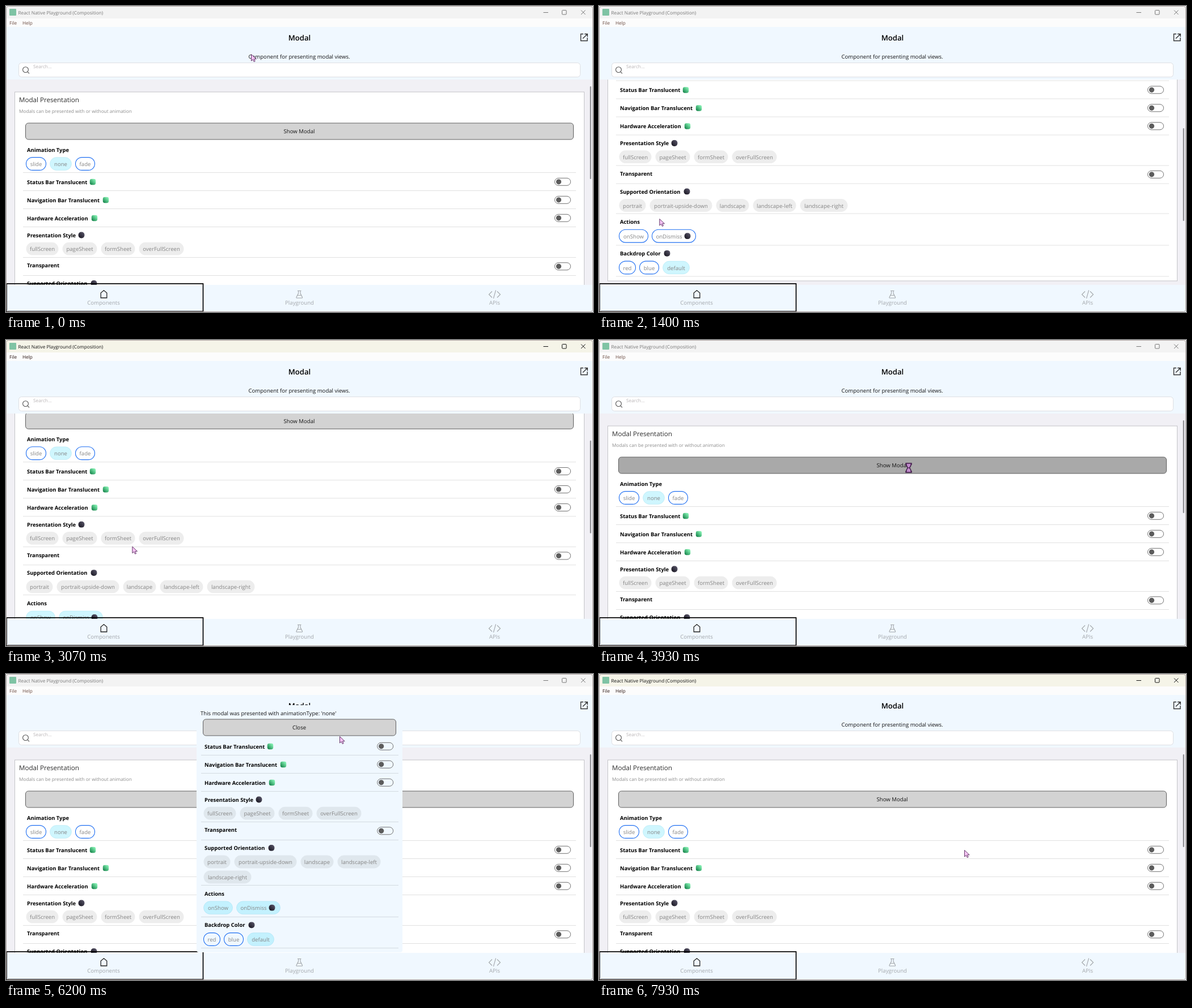
These frames come from a looping animation (1035x541 px, 8 s). An HTML page:

```html
<!DOCTYPE html>
<html lang="en">
<head>
<meta charset="utf-8">
<title>React Native Playground</title>
<style>
  html, body { margin: 0; width: 100%; height: 100%; overflow: hidden; background: #fff; }
  svg { display: block; width: 1035px; height: 541px; }
  text { font-family: "Open Sans", "Noto Sans", sans-serif; font-size: 9.6px; fill: #151515; text-rendering: geometricPrecision; }
  .mid { text-anchor: middle; }
  .small { font-size: 8.25px; }
  .label { font-size: 9.42px; font-weight: 700; fill: #000; }
  .chip .pill { fill: none; stroke: none; }
  .chip text { fill: #858585; }
  .chip.open .pill { stroke: #1f6ff2; stroke-width: 1.1; }
  .chip.on .pill { fill: rgba(0, 204, 247, .19); stroke: rgba(0, 160, 200, .12); }
  .chip.off .pill { fill: rgba(0, 0, 0, .07); }
  .line { stroke: rgba(0, 0, 0, .12); }
  .button rect { fill: #d3d3d3; stroke: #606060; }
  .button.pressed rect { fill: #a9a9a9; }
  .tab text, .tab path { fill: #a3a7ab; }
  .tab path { fill: none; stroke: #a3a7ab; stroke-width: 1.1; }
  #frame text { fill: #777; }
  #frame .menu { fill: #6a4a40; }
  #frame .glyph { stroke: #777; fill: none; }
  #bar { fill: #f3f3f3; }
  .active #bar { fill: #f5f4e8; }
  #frame.active text { fill: #111; }
  #frame.active .menu { fill: #2a1512; }
  #frame.active .glyph { stroke: #111; }
</style>
</head>
<body>
<svg id="stage" viewBox="0 0 1035 541"></svg>
<script>
const $ = id => document.getElementById(id);
const text = (x, y, s, cls = '') => `<text x="${x}" y="${y}" class="${cls}">${s}</text>`;
const rect = (x, y, w, h, attrs = '') => `<rect x="${x}" y="${y}" width="${w}" height="${h}" ${attrs}/>`;
const path = (d, attrs = '') => `<path d="${d}" ${attrs}/>`;
const rule = (x1, x2, y) => path(`M${x1} ${y}H${x2}`, 'class="line"');
const green = (x, y) => rect(x - 5.2, y - 5.2, 10.4, 10.4, 'rx="3.4" fill="url(#green)"');
const dark = (x, y) => rect(x - 5.4, y - 5.4, 10.8, 10.8, 'rx="4.8" fill="url(#dark)"');

const button = (id, x, y, w, label) => `<g id="${id}" class="button">
  ${rect(x + .5, y, w - 1, 29, 'rx="5"')}${text(517, y + 18.3, label, 'mid')}</g>`;

const toggle = (x, y) => rect(x - 14, y - 6.5, 28, 13, 'rx="6.5" fill="none" stroke="#707070"')
  + `<circle cx="${x - 7}" cy="${y}" r="4.6" fill="#5c5c5c"/>`;

// items: [label, width, state, id, badge]; chips sit 6px apart
function chips(x, y, items) {
  return items.map(([label, w, state, id = '', badge]) => {
    const out = `<g class="chip ${state}" id="${id}">
      ${rect(x + .5, y - 11.4, w - 1, 22.8, 'rx="11.4" class="pill"')}
      ${text(x + w / 2 - (badge ? 8.5 : 0), y + 4, label, 'mid')}
      ${badge ? dark(x + w - 15, y) : ''}</g>`;
    x += w + 6;
    return out;
  }).join('');
}

// The option list is shared by the page card and the modal.
function options({ dx, dy, left, right, switchX, wrap, prefix }) {
  const x = 37 + dx, cx = 35 + dx;
  let out = '';
  const label = (y, s, mark, markX) => {
    out += text(x, y + 3.6, s, 'label') + (mark ? mark(markX + dx, y) : '');
  };
  const chipRow = (y, items) => { out += chips(cx, y, items); };
  const line = y => { out += rule(left, right, y + .5); };

  [['Status Bar Translucent', 153], ['Navigation Bar Translucent', 176], ['Hardware Acceleration', 156]]
    .forEach(([name, markX], i) => {
      const y = 311 + dy + i * 32;
      label(y, name, green, markX);
      out += toggle(switchX, y - .2);
      line(y + 15);
    });
  label(405 + dy, 'Presentation Style', dark, 133);
  chipRow(429.2 + dy, [['fullScreen', 58, 'off'], ['pageSheet', 62, 'off'], ['formSheet', 61, 'off'], ['overFullScreen', 80, 'off']]);
  line(444 + dy);
  label(458.7 + dy, 'Transparent');
  out += toggle(switchX, 460.3 + dy);
  line(476 + dy);
  label(490.4 + dy, 'Supported Orientation', dark, 155);
  const places = [['portrait', 48, 'off'], ['portrait-upside-down', 111, 'off'], ['landscape', 59, 'off'],
    ['landscape-left', 77, 'off'], ['landscape-right', 85, 'off']];
  const extra = wrap ? places.splice(4) : [];
  chipRow(515 + dy, places);
  chipRow(542 + dy, extra);
  if (wrap) dy += 27;
  line(529 + dy);
  label(544 + dy, 'Actions');
  const state = wrap ? 'on' : 'open';
  chipRow(569.2 + dy, [['onShow', 52, state, prefix + 'Show'], ['onDismiss', 78, state, prefix + 'Dismiss', true]]);
  line(585 + dy);
  label(599.8 + dy, 'Backdrop Color', dark, 120);
  chipRow(625 + dy, [['red', 30, 'open'], ['blue', 35, 'open'], ['default', 48, 'on']]);
  line(640 + dy);
  return out;
}

const gradient = (id, a, b) => `<linearGradient id="${id}" x1="0" y1="1" x2="1" y2="0">
  <stop offset=".1" stop-color="${a}"/><stop offset=".8" stop-color="${b}"/></linearGradient>`;

const page = `
  ${rect(0, 37, 1035, 504, 'fill="#f0f8ff"')}
  ${rect(0, 130, 1035, 363, 'fill="#f1f0f5"')}
  <g clip-path="url(#view)"><g id="content">
    ${rect(15.5, 152, 1004, 496.5, 'fill="#fff" stroke="#c4c4c8"')}
    <text x="23" y="169.5" style="font-size:11.6px;fill:#2c2c2c">Modal Presentation</text>
    <text x="23" y="189" style="fill:#8c8c8c" class="small">Modals can be presented with or without animation</text>
    ${button('show', 34, 207, 967, 'Show Modal')}
    ${text(37, 257.6, 'Animation Type', 'label')}
    ${chips(35, 279, [['slide', 36, 'open'], ['none', 39, 'on'], ['fade', 35, 'open']])}
    ${rule(30, 1005, 294.5)}
    ${options({ dx: 0, dy: 0, left: 30, right: 1005, switchX: 981.5, prefix: 'page' })}
  </g></g>
  ${rect(1029.7, 0, 2, 164, 'id="thumb" rx="1" fill="#858588"')}
  <text x="517.5" y="61" class="mid" style="font-size:13.1px;font-weight:600;fill:#000">Modal</text>
  ${text(517, 93, 'Component for presenting modal views.', 'mid')}
  ${path('M1018 49.5H1013.5V61.5H1025V56M1020 49.5H1025.2V54.5M1025 49.7L1017 57.5', 'fill="none" stroke="#333" stroke-width="1.4"')}
  ${rect(22.5, 100.5, 990, 25, 'rx="5" fill="#fff" stroke="#dedfe3"')}
  ${path('M37.8 116.2L41 119.4M39.4 112.6A4.9 4.9 0 1 1 29.6 112.6A4.9 4.9 0 1 1 39.4 112.6', 'fill="none" stroke="#505050" stroke-width="1.1"')}
  <text x="48" y="110.3" class="small" style="fill:#b9b4b6">Search...</text>
  ${rect(0, 493, 1035, 48, 'fill="#f0f8ff"')}
  ${rect(1, 491, 346.5, 49, 'fill="none" stroke="#000" stroke-width="1.7"')}
  <g class="tab">
    ${path('M167.2 516V507.3L172.5 502.8L177.8 507.3V516Z', 'style="stroke:#222;stroke-width:1.3"')}
    ${path('M514 503.5H520.5M515.5 503.5V508L512 515Q511.7 516.3 513 516.3H521.5Q522.8 516.3 522.5 515L519 508V503.5M513.8 511.5H520.8')}
    ${path('M857 504.5L851.5 510L857 515.5M866 504.5L871.5 510L866 515.5M863.6 502.5L859.5 517')}
    ${text(172, 527.7, 'Components', 'mid')}${text(517.5, 527.7, 'Playground', 'mid')}${text(861.5, 527.7, 'APIs', 'mid')}
  </g>`;

const frame = `<g id="frame">
  ${rect(0, 0, 1035, 22, 'id="bar"')}${rect(0, 22, 1035, 15, 'fill="#fcfcfc"')}
  ${rect(6, 5, 12, 12, 'rx="1" fill="#7fc3a4"')}
  ${text(21.5, 14.5, 'React Native Playground (Composition)', 'small')}
  ${text(6, 32.8, 'File', 'small menu')}${text(29, 32.8, 'Help', 'small menu')}
  ${path('M947.5 11.5H956M981.5 7.5H987Q988 7.5 988 8.5V14Q988 15 987 15H981.5Q980.5 15 980.5 14V8.5Q980.5 7.5 981.5 7.5ZM1014 7.5L1021.5 15M1021.5 7.5L1014 15', 'class="glyph"')}
  ${rect(.5, .5, 1034, 540, 'rx="4" fill="none" stroke="#b3a8a6"')}
</g>`;

const modal = `<g id="modal">
  ${rect(336, 55, 363, 437, 'rx="4" fill="#f0f8ff"')}
  ${text(343, 73, "This modal was presented with animationType: 'none'")}
  ${button('close', 347, 80, 341, 'Close')}
  ${options({ dx: 313, dy: -183, left: 344, right: 692, switchX: 668.7, wrap: true, prefix: 'modal' })}
</g>`;

const alertBox = `<g id="alert">
  ${rect(270.5, 192.5, 494, 139.5, 'rx="6" fill="#fff" stroke="#9b9b9b" filter="url(#shadow)"')}
  ${path('M271 215V198.5Q271 193 276.5 193H758.5Q764 193 764 198.5V215Z', 'fill="#f9f2e1"')}
  ${text(277, 207, 'Alert', 'small')}
  <text x="288" y="248.3" style="font-size:18.1px">Alert</text>
  <text x="288" y="271" id="message" style="font-size:9.9px"></text>
  ${rect(681.5, 291.5, 65.5, 23.5, 'id="ok"')}
  <text x="714" y="307.5" class="mid" style="fill:#fff;font-size:10px">OK</text>
</g>`;

const cursor = `<g id="cursor">
  ${path('M.5 .5V12L3.3 9.5L5.2 13.5L7.2 12.6L5.4 8.8H9.2Z', 'id="arrow" fill="#f6c4f4" stroke="#55285c" stroke-width=".9" stroke-linejoin="round"')}
  ${path('M-5 -8H5V-6H4Q4 -2 1 0Q4 2 4 6H5V8H-5V6H-4Q-4 2 -1 0Q-4 -2 -4 -6H-5Z', 'id="hourglass" fill="#c08acb" stroke="#3d1746" stroke-width="1.4"')}
</g>`;

$('stage').innerHTML = `<defs>
  ${gradient('green', '#17844c', '#7deaac')}${gradient('dark', '#1b1924', '#4f4c5e')}
  <clipPath id="view">${rect(0, 130, 1035, 363)}</clipPath>
  <filter id="shadow" x="-15%" y="-40%" width="130%" height="200%">
    <feDropShadow dx="0" dy="13" stdDeviation="14" flood-opacity=".46"/></filter>
</defs>${page}${frame}${modal}${alertBox}${cursor}`;

const pointer = [
  [0, 432, 85], [130, 462, 115], [270, 503, 200], [400, 400, 310], [530, 311, 361], [800, 311, 361],
  [1130, 200, 372], [1470, 82, 377], [1730, 53, 408], [2000, 53, 408], [2330, 159, 402], [2530, 160, 402],
  [2800, 190, 385], [3130, 230, 360], [3670, 546, 226], [4530, 546, 226], [4800, 620, 258], [5130, 709, 304],
  [5800, 709, 304], [6200, 588, 110], [6330, 581, 93], [6670, 581, 93], [7270, 658, 302], [7530, 704, 302],
  [7800, 704, 302], [7930, 644, 311]];
// time, scroll offset, scrollbar thumb top
const scrolling = [
  [600, 0, 142], [800, 135, 194], [870, 152, 205], [1000, 162.5, 216],
  [2930, 162.5, 216], [3130, 40, 160], [3330, 0, 142]];

function sample(table, t) {
  const next = table.findIndex(row => row[0] > t);
  if (next === 0) return table[0].slice(1);
  if (next < 0) return table[table.length - 1].slice(1);
  const a = table[next - 1], b = table[next], k = (t - a[0]) / (b[0] - a[0]);
  return a.slice(1).map((v, i) => v + (b[i + 1] - v) * k);
}

const LOOP = 8000, TICK = 1000 / 15;
const between = (t, a, b) => t >= a && t < b;
const show = (id, on) => { $(id).style.display = on ? '' : 'none'; };
const chipState = (id, on) => $(id).setAttribute('class', 'chip ' + (on ? 'on' : 'open'));

function alertOpacity(t) {
  if (between(t, 4060, 5460) || between(t, 6590, 7660)) return 1;
  if (between(t, 5460, 5530)) return .7;
  if (between(t, 5530, 5595)) return .3;
  return between(t, 7660, 7725) ? .4 : 0;
}

function render(time) {
  const t = Math.floor((time + 4) / TICK) * TICK;
  const [x, y] = sample(pointer, t);
  const [offset, thumb] = sample(scrolling, t);
  $('cursor').setAttribute('transform', `translate(${x} ${y})`);
  $('content').setAttribute('transform', `translate(0 ${-offset})`);
  $('thumb').setAttribute('y', thumb);

  const waiting = between(t, 3925, 4060);
  show('hourglass', waiting);
  show('arrow', !waiting);
  $('frame').classList.toggle('active', between(t, 1995, 3925) || t >= 7660);
  $('show').classList.toggle('pressed', between(t, 3925, 3995));
  $('close').classList.toggle('pressed', between(t, 6460, 6530));
  chipState('pageShow', t >= 1995);
  chipState('pageDismiss', t >= 2530);

  show('modal', between(t, 3995, 6530));
  const opacity = alertOpacity(t);
  show('alert', opacity > 0);
  $('alert').setAttribute('opacity', opacity);
  $('message').textContent = t < 6000 ? 'onShow' : 'onDismiss';
  $('ok').setAttribute('fill', x > 681 && y > 291 ? '#e17781' : '#d9535f');
}

const start = performance.now();
function loop() {
  render((performance.now() - start) % LOOP);
  requestAnimationFrame(loop);
}
loop();
</script>
</body>
</html>
```
